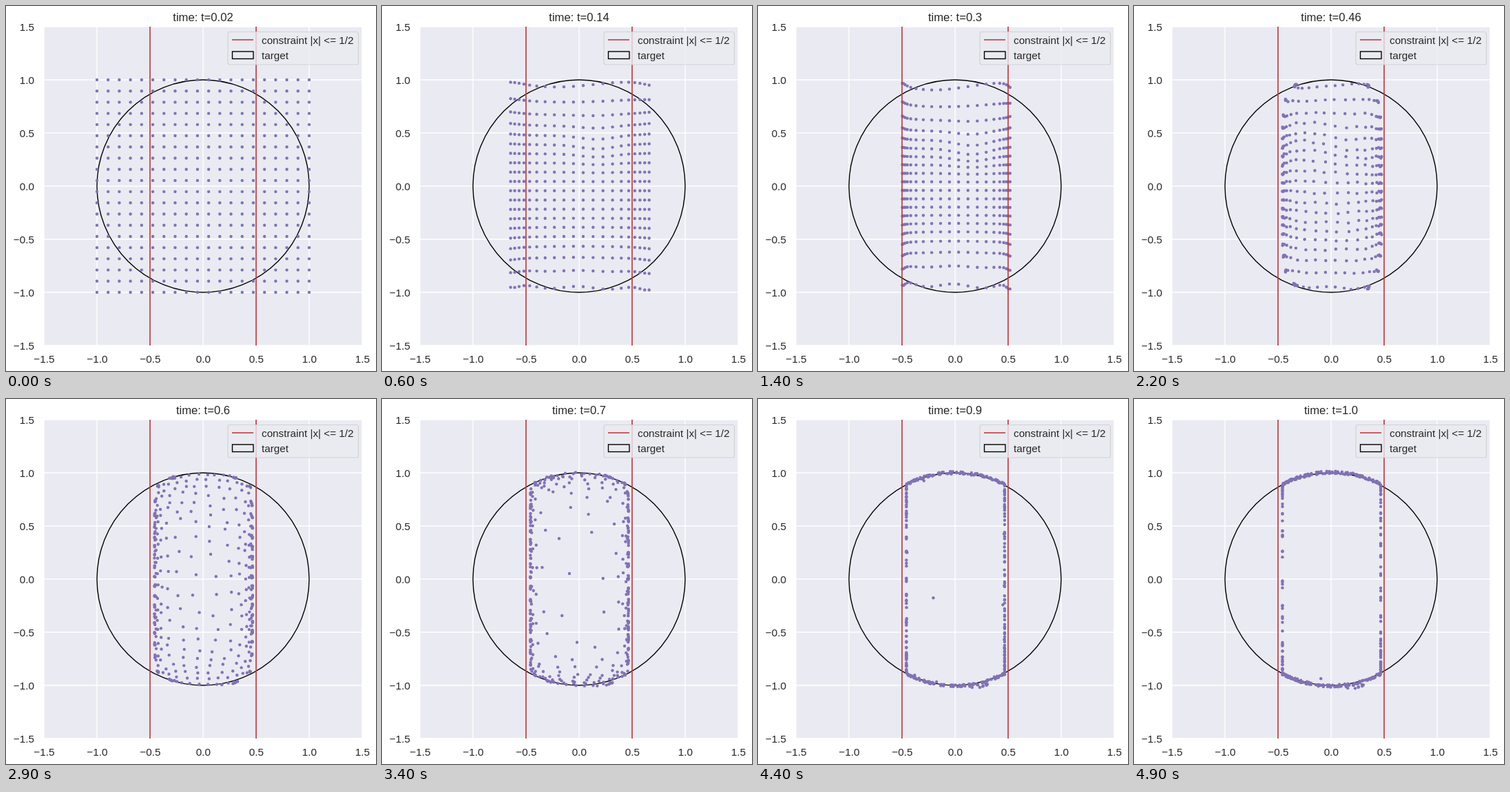
An HTML page with a canvas for the animation above (5 s loop, 537 by 529 pixels).

```html
<!DOCTYPE html>
<html lang="en">
<head>
<meta charset="utf-8">
<title>Constrained flow</title>
<style>
html, body { margin: 0; width: 100%; height: 100%; overflow: hidden; background: #fff; }
canvas { display: block; }
</style>
</head>
<body>
<canvas id="stage" width="537" height="529"></canvas>
<script>
const ctx = document.getElementById('stage').getContext('2d');
const FONT = '"Liberation Sans", Arial, sans-serif';
const INK = '#262626', FACE = '#eaeaf2', RED = '#c2383e', DOT = '#8172b3';
const N = 20, STEPS = 50, STEP_MS = 100, WALL = 0.463;
const TICKS = [-1.5, -1, -0.5, 0, 0.5, 1, 1.5];

const px = x => 286 + 154 * x;
const py = y => 261 - 154 * y;
const bump = (u, v, cu, cv, k) => Math.exp(-k * ((u - cu) ** 2 + (v - cv) ** 2));

// repeatable noise in -1..1
function noise(n) {
  const s = Math.sin(n * 127.1 + 11.7) * 43758.5453;
  return 2 * (s - Math.floor(s)) - 1;
}

// growth from v that levels off at cap
function grow(v, s, cap) {
  const e = Math.exp(s), q = v / cap;
  return v * e / Math.sqrt(1 + q * q * (e * e - 1));
}

// column positions once the outer ones are squeezed between the walls
function squeeze(u) {
  const v = 0.8 * u;
  return v / Math.pow(1 + Math.pow(Math.abs(v) / WALL, 5), 0.2);
}

function place(i, j, t) {
  const u = -1 + 2 * i / (N - 1), v = -1 + 2 * j / (N - 1);
  const id = i * N + j, au = Math.abs(u), av = Math.abs(v);
  const ramp = 1 - Math.exp(-8.5 * (t - 0.02));
  const late = Math.max(0, (t - 0.3) / 0.7);

  // inward squeeze
  let x = u + (squeeze(u) - u + 0.012 * (2 * au - 1)) * ramp;
  let dy = v * (0.74 + 0.19 * v ** 4) - v - 0.2 * v ** 3 * (1 - v * v) * (1 - u * u);
  const edge = v ** 10;
  dy += edge * (v > 0 ? 0.035 * Math.sin(4 * (u - 0.15)) : 0.018 * Math.cos(10 * u) - 0.02 * u);
  dy -= 0.06 * bump(u, v, 0.2, 0.5, 16);
  let y = v + dy * ramp;

  // first and last rows curl towards the middle
  x *= 1 - 0.55 * (1 - Math.exp(-3.15 * late)) * edge * au;

  // drift and loosening of the inner lattice
  const inner = 1 - u * u;
  x += late * (0.08 * bump(u, v, 0.1, -0.35, 6) + 0.035 * inner * noise(id));
  y += late * (0.14 * bump(u, v, -0.45, 0.35, 9) - 0.06 * Math.exp(-6 * y * y)
    + 0.035 * (1 - edge) * noise(id + 500));

  // outward push to the walls and the arcs
  if (late > 0) {
    const cap = Math.sqrt(1 - Math.min(Math.abs(x), WALL) ** 2);
    y = grow(y, 1.6 * late ** 2.8, cap);
    const r = Math.max(Math.abs(x) / WALL, Math.hypot(x, y), 1e-4);
    const k = grow(r, 4 * late * late, 1) / r;
    x = x * k + 0.005 * late;
    y *= k * (1 + late * 0.013 * (0.4 + noise(id + 900)));
    if (j === 0 && u > 0) y -= 0.04 * late * Math.sqrt(u);
  }
  return [x, y];
}

function line(x1, y1, x2, y2, color, width) {
  ctx.strokeStyle = color;
  ctx.lineWidth = width;
  ctx.beginPath();
  ctx.moveTo(x1, y1);
  ctx.lineTo(x2, y2);
  ctx.stroke();
}

function label(str, x, y, align, size = 15.28) {
  ctx.font = size + 'px ' + FONT;
  ctx.textAlign = align;
  ctx.fillStyle = INK;
  ctx.fillText(str, x, y);
}

function drawAxes() {
  ctx.fillStyle = '#fff';
  ctx.fillRect(0, 0, 537, 529);
  ctx.fillStyle = FACE;
  ctx.fillRect(55, 30, 462, 462);
  for (const v of TICKS) {
    line(px(v), 30, px(v), 492, '#fff', 1.4);
    line(55, py(v), 517, py(v), '#fff', 1.4);
    const str = v.toFixed(1).replace('-', '\u2212');
    label(str, px(v) + 0.4, 517, 'center');
    label(str, 41, py(v) + 5.5, 'right');
  }
}

function drawLegend() {
  ctx.beginPath();
  ctx.roundRect(322, 37.5, 189.5, 47.5, 3);
  ctx.globalAlpha = 0.8;
  ctx.fillStyle = FACE;
  ctx.fill();
  ctx.strokeStyle = '#ccc';
  ctx.lineWidth = 1.2;
  ctx.stroke();
  ctx.globalAlpha = 1;
  line(328, 49, 359, 49, RED, 1.6);
  ctx.strokeStyle = '#000';
  ctx.lineWidth = 1.4;
  ctx.strokeRect(328.5, 66, 30.5, 10.5);
  label('constraint |x| <= 1/2', 371, 55, 'left');
  label('target', 371, 77, 'left');
}

function draw(t) {
  drawAxes();
  ctx.strokeStyle = '#000';
  ctx.lineWidth = 1.4;
  ctx.beginPath();
  ctx.arc(px(0), py(0), 154, 0, 2 * Math.PI);
  ctx.stroke();

  ctx.fillStyle = DOT;
  for (let i = 0; i < N; i++) {
    for (let j = 0; j < N; j++) {
      const [x, y] = place(i, j, t);
      ctx.beginPath();
      ctx.arc(px(x), py(y), 2.2, 0, 2 * Math.PI);
      ctx.fill();
    }
  }

  for (const x of [-0.5, 0.5]) line(px(x), 30, px(x), 492, RED, 1.7);
  drawLegend();
  const clock = t === 1 ? '1.0' : String(t);
  label('time: t=' + clock, 286, 22, 'center', 16.67);
}

const start = performance.now();
function tick() {
  const ms = Math.max(0, performance.now() - start);
  const step = Math.floor(ms / STEP_MS) % STEPS;
  draw((step + 1) * 2 / 100);
  requestAnimationFrame(tick);
}
tick();
</script>
</body>
</html>
```
